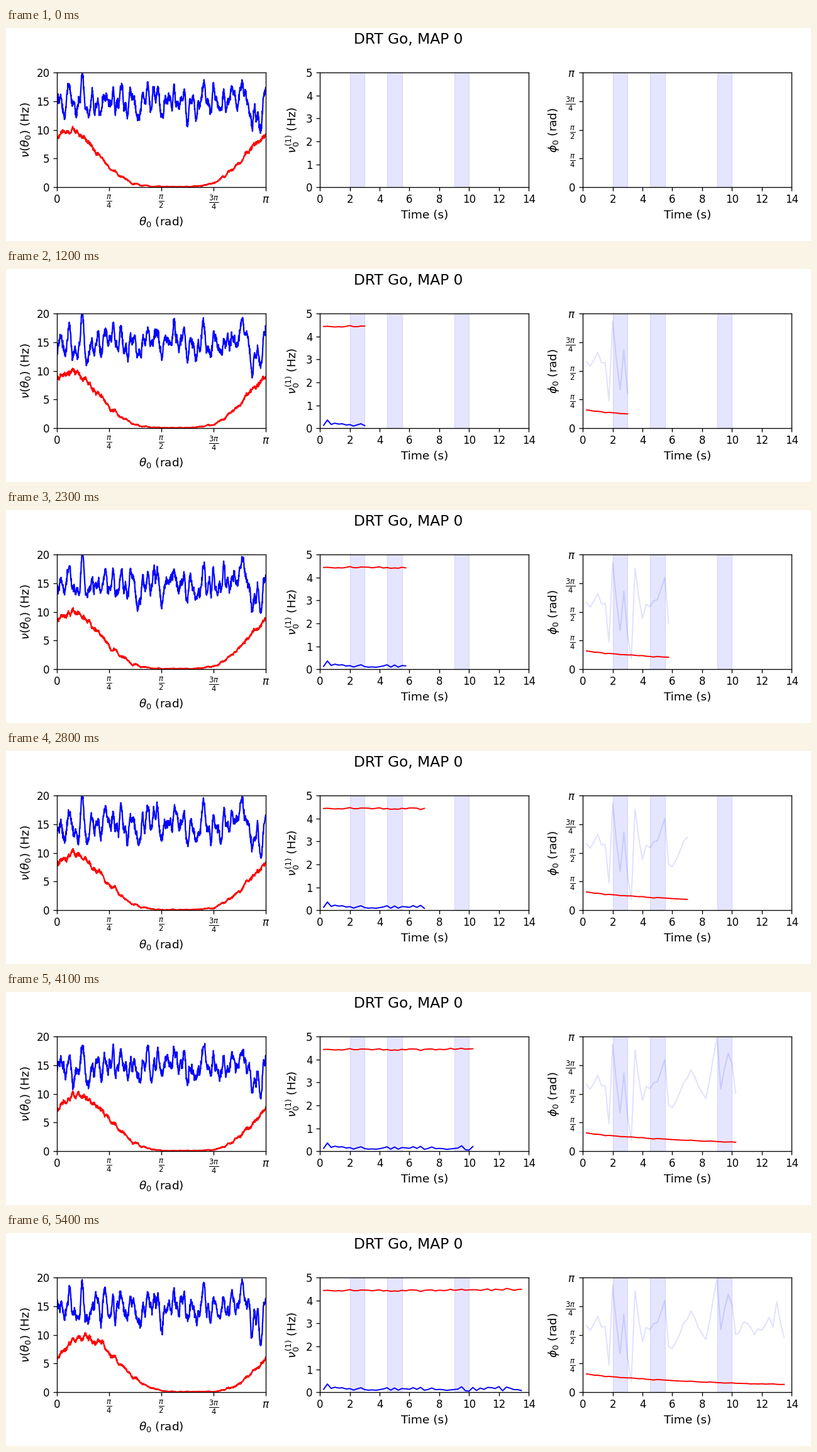
Animation of 1280x340 px, one loop 5500 ms. Source, as a matplotlib script:

```python
import numpy as np
import matplotlib.pyplot as plt
from matplotlib.animation import FuncAnimation

W, H = 1280, 340
FRAMES, INTERVAL = 55, 100
DT = 0.25  # seconds of recording per frame
PI = np.pi
N = 1000

plt.rcParams.update({
    "font.family": "DejaVu Sans", "font.size": 12,
    "axes.labelsize": 13.3, "axes.labelpad": 4.8, "axes.linewidth": 0.96,
    "xtick.major.size": 4.2, "ytick.major.size": 4.2,
    "xtick.major.pad": 3.6, "ytick.major.pad": 4.2,
    "xtick.major.width": 0.96, "ytick.major.width": 0.96,
    "lines.linewidth": 1.4,
})


def smooth_noise(rng, width):
    """Unit-variance noise correlated over about `width` samples."""
    u = np.arange(-4 * width, 4 * width + 1)
    kernel = np.exp(-0.5 * (u / width) ** 2)
    kernel /= np.sqrt((kernel ** 2).sum())
    return np.convolve(rng.normal(size=N + len(u) - 1), kernel, "valid")


# Slow recordings, one sample per frame
rng = np.random.default_rng(7)
TIME = DT * np.arange(1, FRAMES)
MODE_E = 4.43 + 0.003 * TIME + 0.026 * rng.normal(size=len(TIME))
MODE_I = 0.03 + 0.23 * rng.beta(2, 2.3, size=len(TIME))
MODE_I[1] = 0.36
PHASE_E = 0.14 + 0.36 * np.exp(-TIME / 8.5) + 0.006 * rng.normal(size=len(TIME))

# Main swings of the inhibitory phase: time (s), fraction of pi
SWINGS = [(0.25, .58), (1.5, .58), (1.75, .28), (2, .92), (2.5, .38), (2.75, .63),
          (3.25, .05), (3.5, .82), (4, .42), (4.75, .62), (5.5, .74), (5.75, .36),
          (7.25, .7), (8.25, .45), (9, .97), (9.25, .52), (9.75, .92),
          (10.25, .58), (12.75, .56), (13, .82), (13.5, .48)]
wobble = 0.04 * rng.normal(size=len(TIME))
PHASE_I = PI * np.clip(np.interp(TIME, *zip(*SWINGS)) + wobble, 0.05, 0.99)

# Frozen structure along the ring: strongest peaks and dips as (angle, Hz)
THETA = np.linspace(0, PI, N)
EXTREMES = [(.19, 3), (.38, 4.5), (.47, -2.5), (1.21, -2.5), (1.37, 3), (1.58, -3),
            (2.09, -2.5), (2.2, 3.5), (2.79, 3.5), (2.935, -5.5), (3.065, -5)]
BASE_I = 15 + 1.15 * smooth_noise(rng, 4)
for angle, height in EXTREMES:
    well = np.exp(-0.5 * ((THETA - angle) / 0.022) ** 2)
    BASE_I = 15 + (BASE_I - 15) * (1 - 0.7 * well) + height * well
FROZEN_E = smooth_noise(rng, 5)


def profiles(frame):
    rng = np.random.default_rng(100 + frame)
    centre = 0.17 + 0.27 * (frame / (FRAMES - 1)) ** 2
    bump = 9.5 * (np.cos(THETA - centre) ** 2) ** 2.35 + 0.1
    jitter = 0.13 * FROZEN_E + 0.08 * smooth_noise(rng, 5) + 0.08 * rng.normal(size=N)
    exc = np.maximum(bump + jitter * np.sqrt(bump / 2.2), 0.03)
    inh = BASE_I + 0.7 * smooth_noise(rng, 4) + 0.35 * rng.normal(size=N)
    return exc, inh


def make_axes(left, xlabel, ylabel, xlim, ylim):
    ax = fig.add_axes([left / W, (H - 254.2) / H, 332 / W, 183.3 / H])
    ax.set(xlabel=xlabel, ylabel=ylabel, xlim=(0, xlim), ylim=(0, ylim))
    return ax


fig = plt.figure(figsize=(12.8, 3.4), dpi=100, facecolor="white")
fig.suptitle("DRT Go, MAP 0", fontsize=16.8, y=0.98)

ring = make_axes(81.2, r"$\theta_0$ (rad)", r"$\nu(\theta_0)$ (Hz)", PI, 20)
mode = make_axes(499.2, "Time (s)", r"$\nu_0^{(1)}$ (Hz)", 14, 5)
phase = make_axes(917.2, "Time (s)", r"$\phi_0$ (rad)", 14, PI)

quarters = np.arange(5) * PI / 4
names = ["0", r"$\frac{\pi}{4}$", r"$\frac{\pi}{2}$", r"$\frac{3\pi}{4}$", r"$\pi$"]
ring.set_xticks(quarters, names)
ring.set_yticks(range(0, 21, 5))
phase.set_yticks(quarters, names)
mode.set_yticks(range(6))
for ax in (mode, phase):
    ax.set_xticks(range(0, 15, 2))
    for start in (2, 4.5, 9):
        ax.axvspan(start, start + 1, color="blue", alpha=0.1, lw=1)

ring_e, = ring.plot([], [], color="red", lw=1.6)
ring_i, = ring.plot([], [], color="blue", lw=1.6)
traces = [
    (mode.plot([], [], color="red")[0], MODE_E),
    (mode.plot([], [], color="blue")[0], MODE_I),
    (phase.plot([], [], color="red")[0], PHASE_E),
    (phase.plot([], [], color="blue", alpha=0.12)[0], PHASE_I),
]


def update(frame):
    exc, inh = profiles(frame)
    ring_e.set_data(THETA, exc)
    ring_i.set_data(THETA, inh)
    for line, values in traces:
        line.set_data(TIME[:frame], values[:frame])
    return [ring_e, ring_i] + [line for line, _ in traces]


anim = FuncAnimation(fig, update, frames=FRAMES, interval=INTERVAL,
                     init_func=lambda: update(0), repeat=True, repeat_delay=0)
plt.show()
```
